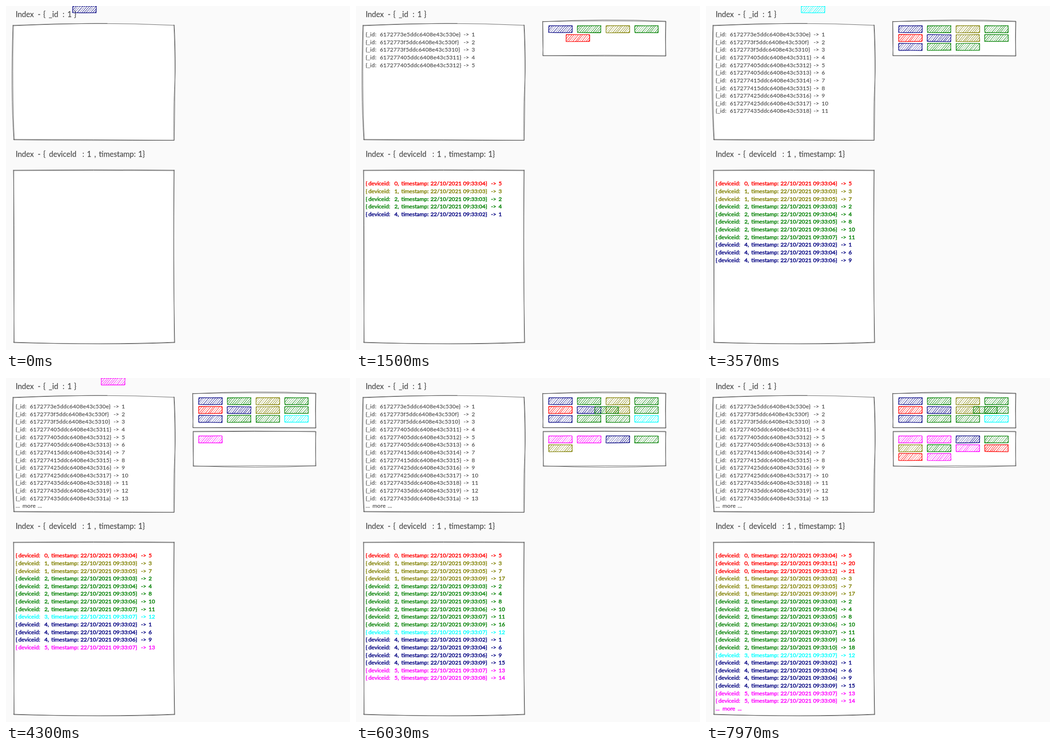
An HTML page for the animation above (8000 ms loop, 748 by 748 pixels).

```html
<!DOCTYPE html>
<html lang="en">
<head>
<meta charset="utf-8">
<title>Index inserts</title>
<style>
  html, body { margin: 0; height: 100%; overflow: hidden; background: #fafafa; }
  svg { display: block; width: 100vw; height: 100vh; }
  text { font-family: Lato, "Open Sans", sans-serif; font-size: 12.2px; fill: #505050; stroke: #505050; stroke-width: .25; white-space: pre; }
  .head { font-size: 16.4px; }
  .ids text { letter-spacing: .3px; }
  .keys text { stroke-width: .5; }
  .line { fill: none; stroke: #484848; stroke-width: .85; stroke-linecap: round; }
</style>
</head>
<body>
<svg viewBox="0 0 748 748">
  <g id="base"></g>
  <g id="pages"></g>
  <g id="ids" class="ids"></g>
  <g id="keys" class="keys"></g>
  <g id="mover"></g>
</svg>
<script>
const COLORS = ['#ff0000', '#808000', '#008000', '#00ffff', '#000080', '#ff00ff'];
const DEVICES = [...'42120412422355421250052'].map(Number);
const SECONDS = [2, 3, 3, 4, 4, 4, 5, 5, 6, 6, 7, 7, 7, 8, 9, 9, 9, 10, 10, 11, 12, 12, 13];
const LOOP = 8000, STEP = 62.4, START_X = 145, LINE = 16.64;
const MAX_IDS = 13, MAX_KEYS = 20;

const el = id => document.getElementById(id);
const two = n => String(n).padStart(2, '0');
const hex = n => n.toString(16).padStart(2, '0');

function seeded(seed) {
  let s = seed * 7919 + 17;
  return () => (s = (s * 16807) % 2147483647) / 2147483647;
}

// Sketchy hatched rectangle, 51 by 15
function blockPath(seed) {
  const rnd = seeded(seed), W = 51, H = 15, slant = 13;
  const j = a => (rnd() - .5) * a;
  const pt = (x, y, a = 1.2) => (x + j(a)).toFixed(1) + ' ' + (y + j(a)).toFixed(1);
  let hatch = '', edge = '';
  for (let x = 3; x < W + slant; x += 4.8) {
    const a = Math.max(0, x - W), b = Math.min(1, x / slant);
    const from = pt(x - slant * b, H * b), to = pt(x - a, H * a / slant);
    hatch += `M${from}L${to}`;
    if (rnd() < .6) hatch += `M${to}L${pt(x - slant * b + 1, H * b)}`;
  }
  const corners = [[0, 0], [W, 0], [W, H], [0, H]];
  for (let pass = 0; pass < 2; pass++)
    corners.forEach(([x, y], i) => {
      const [u, v] = corners[(i + 1) % 4];
      edge += `M${pt(x, y)}Q${pt((x + u) / 2, (y + v) / 2)} ${pt(u, v)}`;
    });
  return { hatch, edge };
}

let clock = 0;
const docs = DEVICES.map((device, i) => {
  const page = Math.floor(i / 12), row = Math.floor(i % 12 / 4), col = i % 4;
  const x = 419 + STEP * col, y = (page ? 126 : 43) + 19.2 * row;
  const across = Math.ceil((x - START_X) / STEP), down = Math.ceil(y / STEP);
  const doc = { n: i + 1, device, page, x, y, across, down, start: clock,
                color: COLORS[device], sec: SECONDS[i], path: blockPath(i + 1) };
  doc.indexed = clock + across + down + 1;
  doc.landed = clock = doc.indexed + 1;
  return doc;
});

const block = (d, x, y) =>
  `<g transform="translate(${x.toFixed(1)} ${y.toFixed(1)})" fill="none" stroke="${d.color}">` +
  `<path d="${d.path.hatch}" stroke-width=".7"/><path d="${d.path.edge}" stroke-width=".9"/></g>`;

// Words placed at column positions on one baseline
function words(y, cells, attrs = '') {
  const spans = cells.map(([x, s]) => `<tspan x="${x}">${s.replace('>', '&gt;')}</tspan>`);
  return `<text y="${y.toFixed(1)}" ${attrs}>${spans.join('')}</text>`;
}

const paint = color => `style="fill:${color};stroke:${color}"`;

const frameBox = (fill, lines) =>
  `<path d="${fill}" fill="#fff"/><path d="${lines}" class="line"/>`;

const PAGES = [
  frameBox('M406 34Q540 29 673 33L674 108L407 108Z',
    'M406 34Q540 27 673 33M407 34Q530 31 674 34M673 33Q672 70 674 108M674 34Q673 80 673 109' +
    'M674 108Q540 106 407 108M673 109Q540 109 406 108M407 108Q405 70 406 34M406 107Q408 75 406 33'),
  frameBox('M407 116L674 117L673 191Q540 194 407 191Z',
    'M407 116Q540 114 674 117M408 117Q540 116 673 116M674 117Q672 150 674 191M673 117Q674 160 673 191' +
    'M674 191Q540 190 407 192M673 191Q545 197 407 191M407 191Q408 150 407 116M408 191Q406 150 407 117')
];

el('base').innerHTML =
  frameBox('M15 42Q200 34 366 42Q370 130 365 292L17 290Q11 180 15 42Z',
    'M15 42Q200 34 366 42M16 43Q130 38 220 38M366 42Q370 125 367 170T365 292M365 41Q369 120 366 291' +
    'M365 292Q190 290 16 290M366 292Q180 293 17 291M17 290Q10 190 15 42M18 291Q13 180 16 42') +
  frameBox('M17 357L366 357Q363 540 366 732Q220 738 17 731Z',
    'M16 357Q190 355 366 357M17 358Q190 357 365 358M365 357Q364 540 366 732M366 357Q363 560 367 732' +
    'M366 732Q220 738 16 731M366 731Q210 737 17 732M17 731Q19 500 16 357M18 731Q16 560 17 358') +
  words(24.3, [[21, 'Index'], [69, '-'], [81, '{'], [93, '_id'], [123, ':'], [133.5, '1'], [148, '}']], 'class="head"') +
  words(328, [[21, 'Index'], [69, '-'], [81, '{'], [93.5, 'deviceId'], [166, ':'], [176, '1'], [192, ','],
              [202, 'timestamp:'], [287.5, '1}']], 'class="head"');

function list(items, max, top, row, moreColor) {
  const out = items.slice(0, max).map((d, i) => row(d, top + i * LINE));
  if (items.length >= max)
    out.push(words(top + max * LINE, [[21, '...'], [36, 'more'], [69, '...']], paint(moreColor)));
  return out.join('');
}

const idRow = (d, y) => words(y, [
  [21, '{_id:'],
  [52, `617277${hex(60 + d.sec)}5ddc6408e43c53${hex(13 + d.n)}}`],
  [234, '->'], [251.5, String(d.n)]
]);

const keyRow = (d, y) => words(y, [
  [21, '{'], [27, 'deviceid:'], [83.5, d.device + ','], [98.5, 'timestamp:'],
  [162, '22/10/2021'], [233, `09:33:${two(d.sec)}}`], [293.5, '->'], [310, String(d.n)]
], paint(d.color));

function draw(f) {
  const landed = docs.filter(d => f >= d.landed);
  const indexed = docs.filter(d => f >= d.indexed);
  const sorted = [...indexed].sort((a, b) => a.device - b.device || a.n - b.n);
  const moving = docs.find(d => f >= d.start && f < d.landed);

  el('pages').innerHTML =
    PAGES.filter((_, p) => landed.some(d => d.page === p)).join('') +
    landed.map(d => block(d, d.x, d.y)).join('');
  el('ids').innerHTML = list(indexed, MAX_IDS, 66, idRow, '#505050');
  el('keys').innerHTML = list(sorted, MAX_KEYS, 390.2, keyRow, COLORS[5]);

  // Across first, then down, then one step of rest
  const k = f - moving.start;
  const right = Math.min(k, moving.across);
  const down = Math.min(k - right, moving.down);
  el('mover').innerHTML = block(moving, START_X + STEP * right, STEP * down);
}

// 30 steps a second on a 10 ms grid
function stepAt(ms) {
  const r = ms % 100;
  return 3 * Math.floor(ms / 100) + (r >= 30) + (r >= 70);
}

let last = -1;
function tick() {
  const f = stepAt(performance.now() % LOOP);
  if (f !== last) draw(last = f);
  requestAnimationFrame(tick);
}
tick();
</script>
</body>
</html>
```
